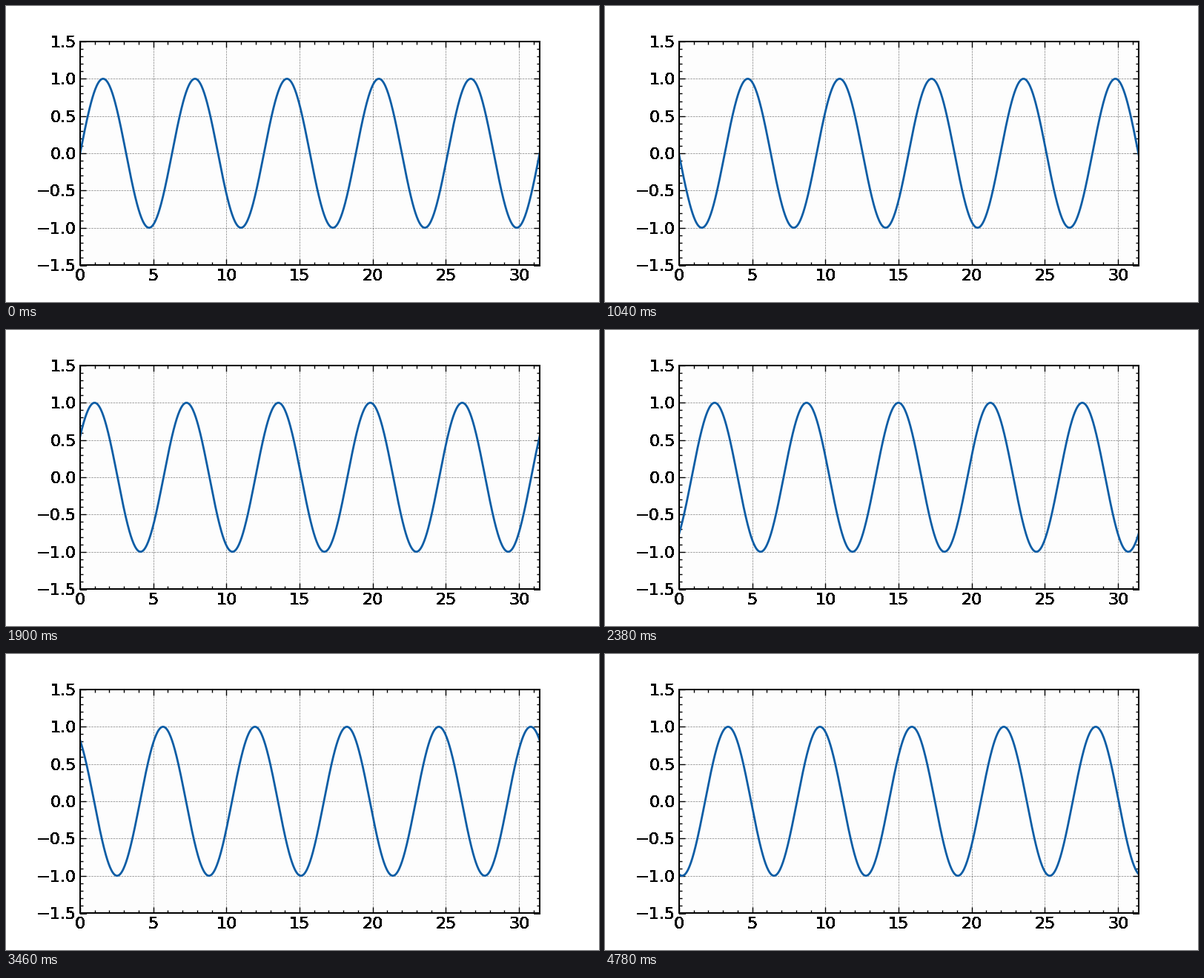
Recreate the animation shown at these times as a matplotlib script. Size 800 by 400 pixels, loop 4800 ms.

```python
import numpy as np
import matplotlib.pyplot as plt
from matplotlib.animation import FuncAnimation

FRAMES = 240
INTERVAL = 20  # ms
SHIFT = 0.06   # phase advance per frame

style = {
    "font.family": "DejaVu Sans",
    "axes.linewidth": 1.5,
    "axes.axisbelow": True,
    "grid.color": "black",
    "grid.alpha": 0.5,
    "grid.linestyle": "--",
    "grid.linewidth": 0.5,
}
for axis, sides in (("xtick", ("top", "bottom")), ("ytick", ("left", "right"))):
    style.update({
        f"{axis}.direction": "in",
        f"{axis}.labelsize": 16,
        f"{axis}.major.size": 6,
        f"{axis}.major.width": 1,
        f"{axis}.minor.size": 3,
        f"{axis}.minor.width": 1,
        f"{axis}.minor.visible": True,
    })
    style.update({f"{axis}.{side}": True for side in sides})
plt.rcParams.update(style)


def harden(img, dpi):
    """Make soft outer edges fully opaque, so labels look crisp and heavy."""
    img[..., 3] = img[..., 3] > 0.1
    return img, 0, 0


fig, ax = plt.subplots(figsize=(8, 4), dpi=100, facecolor="white")
fig.subplots_adjust(left=0.125, right=0.9, bottom=0.125, top=0.88)
ax.set_facecolor("#fdfdfd")
ax.set_xlim(0, 10 * np.pi)
ax.set_ylim(-1.5, 1.5)
ax.grid(True)
ax.set_agg_filter(harden)

x = np.linspace(0, 10 * np.pi, 1000)
wave, = ax.plot(x, np.sin(x), color="#0C5DA5", lw=2)


def update(i):
    wave.set_ydata(np.sin(x - SHIFT * i))
    return wave,


anim = FuncAnimation(fig, update, frames=FRAMES, interval=INTERVAL,
                     repeat=True, repeat_delay=0, blit=False)
plt.show()
```
